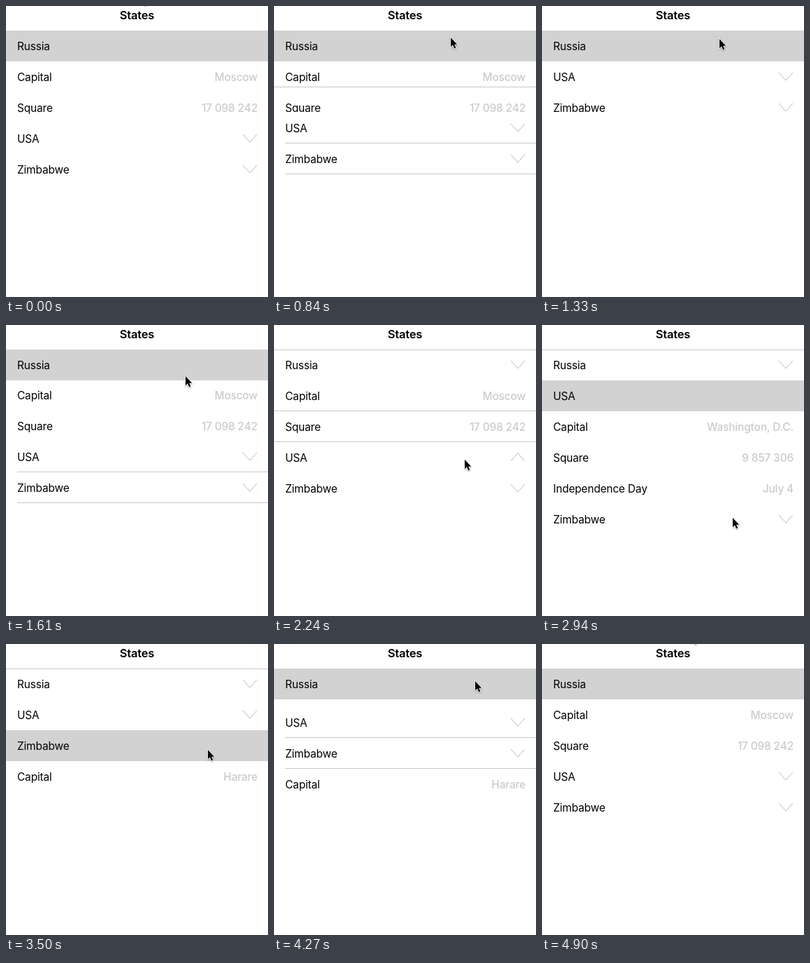
Animation of 375 by 415 pixels, one loop 5040 ms. Source, as an HTML page with a canvas:

```html
<!DOCTYPE html>
<html lang="en">
<head>
<meta charset="utf-8">
<title>States</title>
<style>
html, body { margin: 0; width: 375px; height: 415px; overflow: hidden; background: #fff; }
canvas { display: block; }
</style>
</head>
<body>
<canvas id="stage" width="375" height="415"></canvas>
<script>
const ctx = document.getElementById('stage').getContext('2d');
const LOOP = 5040, STEP = 70, DURATION = 300;
const WIDTH = 375, TOP = 35, ROW = 44, BASELINE = 27.5;
const LINE = '#c8c8c8', VALUE = '#cbcbcb', SELECTED = '#d2d2d2', CHEVRON = '#b9b9b9';

const sections = [
  { name: 'Russia', rows: [['Capital', 'Moscow'], ['Square', '17 098 242']] },
  { name: 'USA', rows: [['Capital', 'Washington, D.C.'], ['Square', '9 857 306'], ['Independence Day', 'July 4']] },
  { name: 'Zimbabwe', rows: [['Capital', 'Harare']] }
];

// each tap leaves one section open, or none (-1)
const taps = [
  { at: -DURATION, open: 0 }, { at: 760, open: -1 }, { at: 1330, open: 0 },
  { at: 2240, open: 1 }, { at: 3150, open: 2 }, { at: 4200, open: 0 }
];

const home = { x: 193, y: -17 };
const moves = [
  { start: 0, end: 280, x: 250, y: 41 },
  { start: 280, end: 1330, x: 253, y: 46 },
  { start: 1420, end: 2100, x: 272, y: 191 },
  { start: 2460, end: 2940, x: 272, y: 274 },
  { start: 3290, end: 3500, x: 288, y: 152 },
  { start: 3480, end: 3720, x: 287, y: 52 },
  { start: 4400, end: 4800, x: 213, y: -16 }
];

const ease = u => (1 - Math.cos(Math.PI * Math.min(1, Math.max(0, u)))) / 2;

function text(str, x, y, color, { align = 'left', font = '15.5px', spacing = -0.2 } = {}) {
  ctx.font = `${font} Inter, sans-serif`;
  ctx.letterSpacing = `${spacing}px`;
  ctx.textAlign = align;
  ctx.fillStyle = color;
  ctx.fillText(str, x, y);
}

function box(x, y, w, h, color) {
  ctx.fillStyle = color;
  ctx.fillRect(x, y, w, h);
}

const line = (x, y) => box(x, Math.round(y), WIDTH - x, 1, LINE);

function chevron(y, up) {
  const [edge, tip] = up ? [27, 16] : [16, 27];
  ctx.beginPath();
  ctx.moveTo(339, y + edge);
  ctx.lineTo(349, y + tip);
  ctx.lineTo(359, y + edge);
  ctx.strokeStyle = CHEVRON;
  ctx.stroke();
}

// closing rows stay put and get covered; opening rows slide down from above
function body(rows, top, height, closing, amount) {
  const slide = closing ? 0 : height - rows.length * ROW;
  ctx.save();
  ctx.beginPath();
  ctx.rect(0, top, WIDTH, amount < 1 ? height - 1 : height);
  ctx.clip();
  rows.forEach(([label, value], k) => {
    const y = top + k * ROW + slide + BASELINE;
    text(label, 16, y, '#000');
    text(value, 360, y, VALUE, { align: 'right', font: '500 15.5px' });
    if (closing) line(0, top + (k + 1) * ROW * amount - 1);
  });
  ctx.restore();
}

function table(t) {
  const n = taps.filter(tap => tap.at <= t).length - 1;
  const { at, open: to } = taps[n];
  const from = n ? taps[n - 1].open : -1;
  const p = ease((t - at) / DURATION);
  const moving = p > 0 && p < 1;
  const toggled = from < 0 || to < 0;
  const selected = toggled ? 0 : p > 0 ? to : -1;
  const highest = toggled ? 0 : Math.min(from, to);
  let y = TOP;
  sections.forEach(({ name, rows }, i) => {
    const amount = i === to ? p : i === from ? 1 - p : 0;
    const height = Math.round(rows.length * ROW * amount);
    box(0, y, WIDTH, ROW, i === selected ? SELECTED : '#fff');
    text(name, 16, y + BASELINE, '#000');
    if (i !== selected) {
      chevron(y, i === to);
      if (moving && i > highest) line(16, y + ROW - 1);
    }
    if (height > 0) body(rows, y + ROW, height, i === from, amount);
    y += ROW + height;
  });
  if (selected !== 0) line(0, TOP);
}

function pointer(t) {
  let { x, y } = home;
  for (const move of moves) {
    const f = ease((t - move.start) / (move.end - move.start));
    x += (move.x - x) * f;
    y += (move.y - y) * f;
  }
  const arrow = new Path2D('M1 1V14.3L4 11.5 6.2 16.4 8.3 15.5 6.2 10.8H10.2Z');
  ctx.save();
  ctx.translate(Math.round(x), Math.round(y));
  ctx.shadowColor = 'rgba(0,0,0,.35)';
  ctx.shadowBlur = 2;
  ctx.shadowOffsetY = 1;
  ctx.strokeStyle = '#fff';
  ctx.lineWidth = 1.6;
  ctx.stroke(arrow);
  ctx.shadowColor = 'transparent';
  ctx.fillStyle = '#000';
  ctx.fill(arrow);
  ctx.restore();
}

function draw() {
  // the small lead keeps step edges clear of timer rounding
  const t = Math.floor(((performance.now() + 4) % LOOP) / STEP) * STEP;
  box(0, 0, WIDTH, 415, '#fff');
  table(t);
  text('States', 187.5, 19, '#000', { align: 'center', font: '600 16.5px' });
  pointer(t);
  requestAnimationFrame(draw);
}
draw();
</script>
</body>
</html>
```
